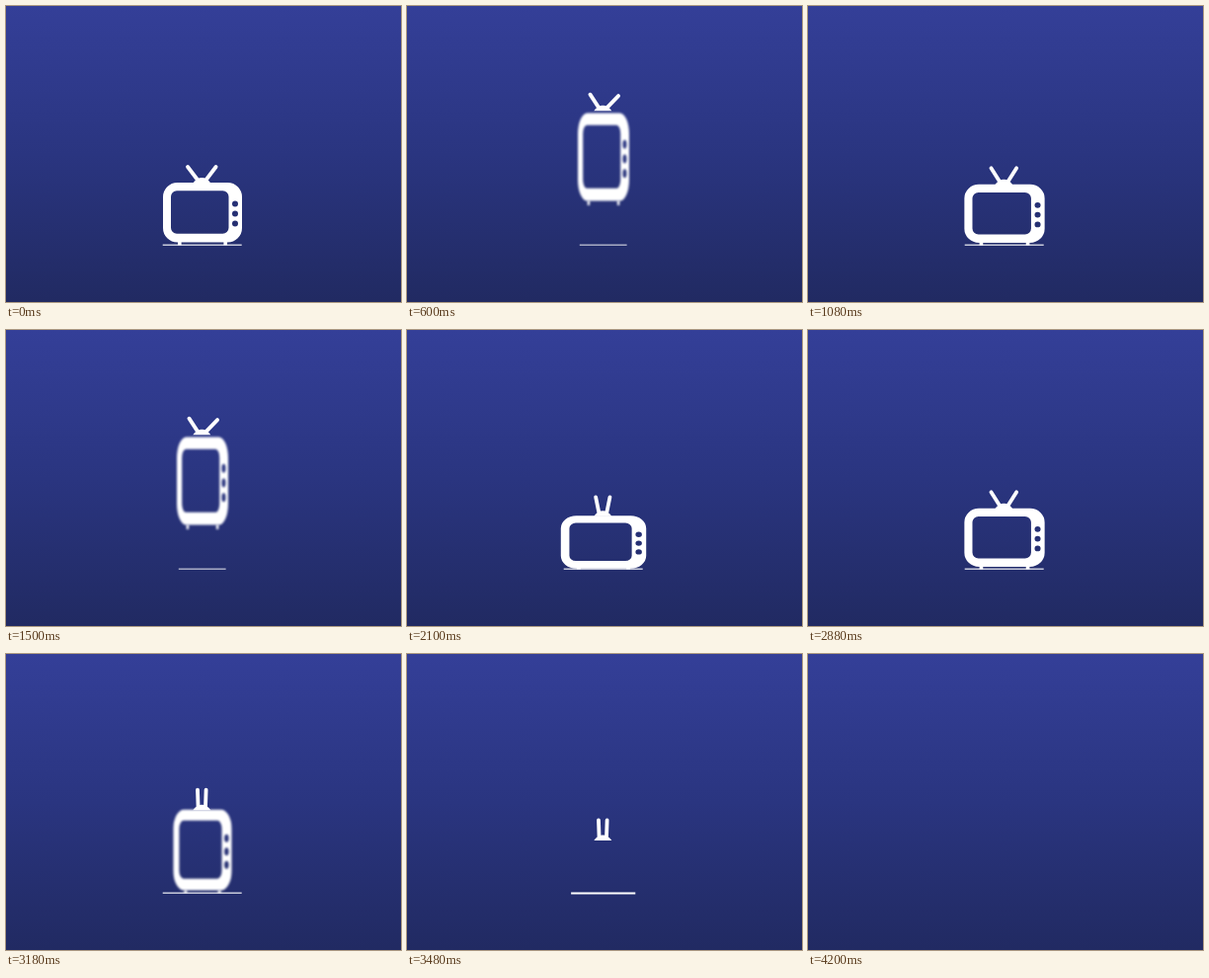
An HTML page with a canvas for the animation above (4950 ms loop, 400 by 300 pixels).

```html
<!DOCTYPE html>
<html lang="en">
<head>
<meta charset="utf-8">
<title>Bouncing television</title>
<style>
  html, body { margin: 0; width: 100%; height: 100%; overflow: hidden; background: #2b3682; }
  canvas { display: block; width: 400px; height: 300px; }
</style>
</head>
<body>
<canvas id="stage" width="400" height="300"></canvas>
<script>
const ctx = document.getElementById('stage').getContext('2d');
const LOOP = 4950, STEP = 30, START = 180, PERIOD = 900, HOPS = 4;
const CENTER = 199, GROUND = 242.5, END = 1320;
const WIDTH = 80, HEIGHT = 60.5, REST = 239.5;

const sky = ctx.createLinearGradient(0, 0, 0, 300);
sky.addColorStop(0, '#343f98');
sky.addColorStop(.5, '#2a3580');
sky.addColorStop(1, '#212a62');

const ramp = (t, from, to) => Math.max(0, Math.min(1, (t - from) / (to - from)));
const arch = u => Math.sin(Math.PI * u);

// Crouch, leap, then either land or (last time) drop through the ground.
function poseAt(t, last) {
  const lands = last ? 0 : 1;
  const crouch = ramp(t, -30, 180) - ramp(t, 180, 270)
    + lands * (ramp(t, 510, 570) - ramp(t, 600, 720));
  const stretch = ramp(t, 210, 330) - lands * ramp(t, 510, 540);
  const drag = ramp(t, -30, 180) - ramp(t, 300, 400)
    + ramp(t, 420, 500) - lands * ramp(t, 510, 660);
  const air = arch(ramp(t, 300, 510));

  const width = WIDTH + 9 * crouch - 28 * stretch;
  const height = HEIGHT - 10 * crouch + 28.5 * stretch;
  const bottom = REST + 3 * crouch - 43 * air;
  const pose = {
    width, height, bottom, drag, air,
    blurred: stretch > .5,
    base: bottom - height - 3 * air,
    line: WIDTH - 33 * air,
    glow: .75 - .15 * air
  };
  if (last) {
    const drop = ramp(t, 510, 600), opening = ramp(t, 420, 510);
    const peek = arch(ramp(t, 990, END));
    pose.bottom += 100 * drop;
    pose.base += 38 * drop + 87 * ramp(t, 600, 720) - 52 * peek;
    pose.line = (WIDTH - 33 * Math.max(air, .45 * opening) + 17 * peek) * (1 - ramp(t, 1200, END));
    pose.glow += (1 - pose.glow) * opening;
  }
  return pose;
}

function drawBody({ width, height, bottom, blurred }) {
  ctx.save();
  ctx.translate(CENTER, bottom - height);
  ctx.scale(width / WIDTH, height / HEIGHT);
  if (blurred) ctx.filter = 'blur(0.8px)';
  ctx.beginPath();
  ctx.roundRect(-WIDTH / 2, 0, WIDTH, HEIGHT, 14.5);
  ctx.roundRect(-32, 8.3, 58.5, 43.5, 6);
  for (let i = 0; i < 3; i++) {
    const y = 21.5 + 10 * i;
    ctx.moveTo(36, y);
    ctx.arc(33, y, 3, 0, Math.PI * 2);
  }
  ctx.fill('evenodd');
  for (const side of [-1, 1]) ctx.fillRect(side * 23.2 - 1.8, HEIGHT - .5, 3.6, 3.5);
  ctx.restore();
}

function drawAntenna({ base, drag, air }) {
  const spread = 14.3 - 10 * drag, reach = 16 + 4 * drag, lean = 1.5 * air;
  ctx.save();
  ctx.translate(CENTER - .7, base);
  ctx.beginPath();
  for (const side of [-1, 1]) {
    ctx.moveTo(side * 3.7, -2);
    ctx.lineTo(side * spread + lean, -reach + (side > 0 ? lean : 0));
  }
  ctx.lineWidth = 3.8;
  ctx.lineCap = 'round';
  ctx.stroke();
  ctx.beginPath();
  ctx.moveTo(-9, .5);
  ctx.quadraticCurveTo(-5, -5, 0, -5);
  ctx.quadraticCurveTo(5, -5, 9, .5);
  ctx.fill();
  ctx.restore();
}

function draw(time) {
  ctx.fillStyle = sky;
  ctx.fillRect(0, 0, 400, 300);
  const index = Math.max(0, Math.min(HOPS - 1, Math.floor((time - START) / PERIOD)));
  const local = time - START - index * PERIOD;
  if (local >= END) return;

  const pose = poseAt(local, index === HOPS - 1);
  ctx.fillStyle = ctx.strokeStyle = '#fff';
  ctx.save();
  ctx.beginPath();
  ctx.rect(0, 0, 400, GROUND);
  ctx.clip();
  drawBody(pose);
  drawAntenna(pose);
  ctx.restore();

  ctx.globalAlpha = pose.glow;
  ctx.fillRect(CENTER - .3 - pose.line / 2, 241.5, pose.line, pose.glow > .8 ? 2 : 1.5);
  ctx.globalAlpha = 1;
}

const began = performance.now();
function tick() {
  const time = (performance.now() - began) % LOOP;
  draw(Math.floor(time / STEP) * STEP);
  requestAnimationFrame(tick);
}
tick();
</script>
</body>
</html>
```
